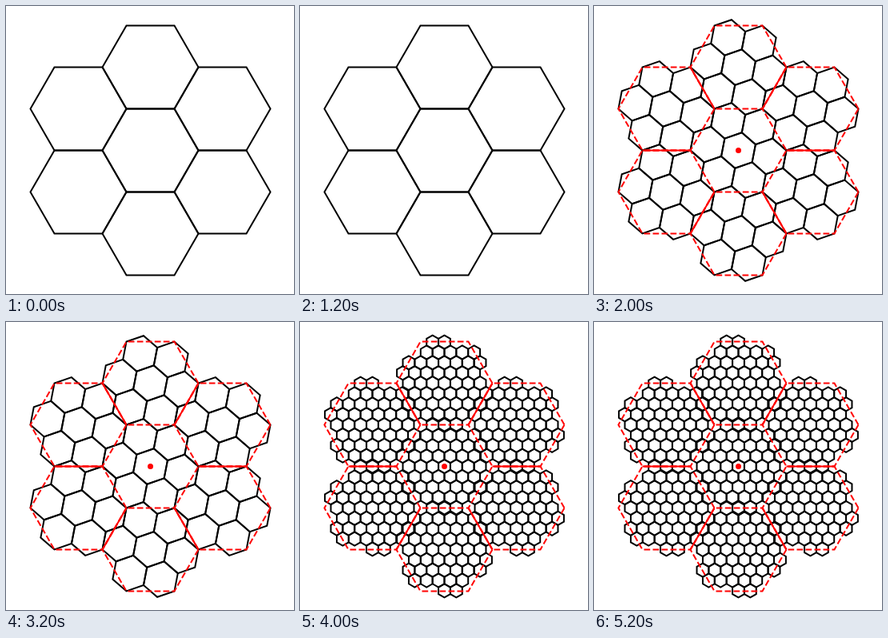
Animation, 360 px wide and 360 px high, one loop 6000 ms. Source, as an HTML page with a canvas:

```html
<!DOCTYPE html>
<html lang="en">
<head>
<meta charset="utf-8">
<style>
html, body { margin: 0; overflow: hidden; background: #fff; }
canvas { display: block; }
</style>
</head>
<body>
<canvas width="360" height="360"></canvas>
<script>
const ctx = document.querySelector('canvas').getContext('2d');
const RADIUS = 60;
const STEP_MS = 2000;
const TWIST = Math.atan(Math.sqrt(3) / 5); // turn of an aperture-7 subdivision
const SIXTH = Math.PI / 3;

const polar = ([x, y], r, a) => [x + r * Math.cos(a), y + r * Math.sin(a)];
const corners = (center, r, turn) =>
  Array.from({ length: 6 }, (_, k) => polar(center, r, turn - k * SIXTH));

// Replaces each cell with itself and its six neighbours; r is the cell radius.
const flower = (cells, r, turn) => cells.flatMap(c =>
  [c, ...corners(c, r * Math.sqrt(3), turn - Math.PI / 2)]);

const origin = [180.5, 180.5];
const parents = flower([origin], RADIUS, 0);
const midRadius = RADIUS / Math.sqrt(7);
const smallRadius = RADIUS / 7;

const levels = [
  { cells: parents, r: RADIUS, turn: 0 },
  { cells: flower(parents, midRadius, -TWIST), r: midRadius, turn: -TWIST },
  {
    cells: flower(flower(parents, midRadius, TWIST - Math.PI / 6), smallRadius, -Math.PI / 6),
    r: smallRadius,
    turn: -Math.PI / 6
  }
];

function strokePath(points, closed = true) {
  ctx.beginPath();
  points.forEach(p => ctx.lineTo(...p));
  if (closed) ctx.closePath();
  ctx.stroke();
}

function drawParentOutlines() {
  ctx.strokeStyle = ctx.fillStyle = '#f00';
  ctx.setLineDash([7.7, 3.3]);
  parents.slice(1).forEach(c => strokePath(corners(c, RADIUS, 0)));
  ctx.setLineDash([]);
  for (let k = 0; k < 6; k++) {
    strokePath([polar(origin, RADIUS, k * SIXTH), polar(origin, 2 * RADIUS, k * SIXTH)], false);
  }
  ctx.beginPath();
  ctx.arc(...origin, 3.5, 0, 2 * Math.PI);
  ctx.fill();
}

function draw(index) {
  const { cells, r, turn } = levels[index];
  ctx.fillStyle = '#fff';
  ctx.fillRect(0, 0, 360, 360);
  ctx.lineWidth = 2;
  ctx.strokeStyle = '#000';
  cells.forEach(c => strokePath(corners(c, r, turn)));
  if (index > 0) drawParentOutlines();
}

const start = performance.now();
let shown = -1;
function tick() {
  const index = Math.floor((performance.now() - start) / STEP_MS) % levels.length;
  if (index !== shown) draw(shown = index);
  requestAnimationFrame(tick);
}
tick();
</script>
</body>
</html>
```
